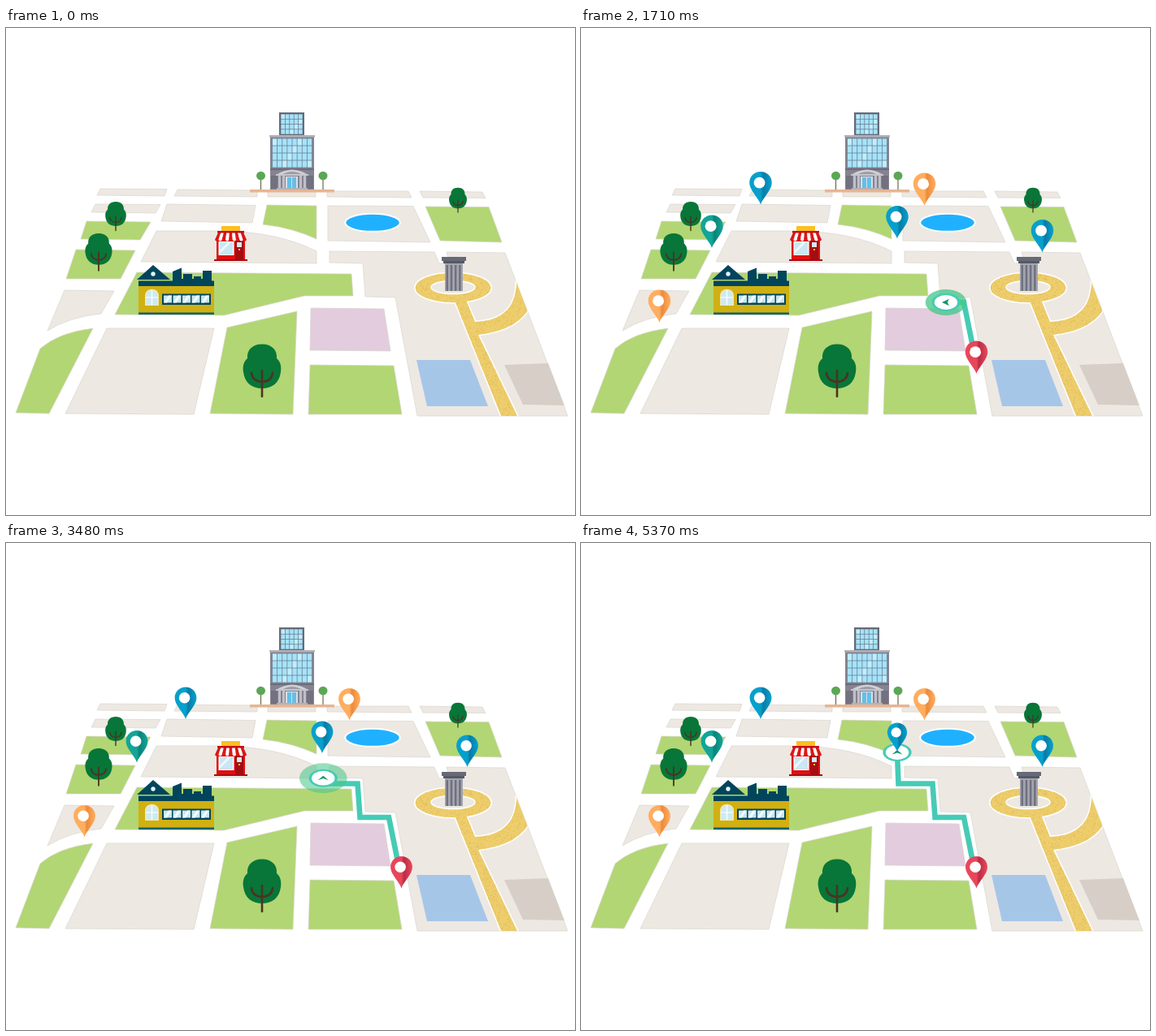
Write an HTML page with a canvas that moves like this. It is 700 by 600 pixels and loops after 5400 ms.

```html
<!DOCTYPE html>
<html lang="en">
<head>
<meta charset="utf-8">
<title>Town map route</title>
<style>
html, body { margin: 0; width: 100%; height: 100%; overflow: hidden; background: #fff; }
canvas { display: block; width: 700px; height: 600px; }
</style>
</head>
<body>
<canvas id="stage" width="700" height="600"></canvas>
<script>
const LOOP = 5400, STEP = 30;
const stage = document.getElementById('stage').getContext('2d');
const mapLayer = document.createElement('canvas');
mapLayer.width = 700;
mapLayer.height = 600;
let c = mapLayer.getContext('2d');

const BEIGE = '#ede8e2', GREEN = '#b2d673', EDGE = '#d9d6cf';
const clamp = v => Math.max(0, Math.min(1, v));

function fill(d, color, edge, width = 0.7) {
  const p = new Path2D(d);
  c.fillStyle = color;
  c.fill(p);
  if (edge) line(p, edge, width);
}
function line(d, color, width) {
  c.strokeStyle = color;
  c.lineWidth = width;
  c.stroke(d instanceof Path2D ? d : new Path2D(d));
}
function box(x, y, w, h, color) {
  c.fillStyle = color;
  c.fillRect(x, y, w, h);
}
function oval(x, y, rx, ry, color, edge, width) {
  c.beginPath();
  c.ellipse(x, y, rx, ry, 0, 0, Math.PI * 2);
  if (color) { c.fillStyle = color; c.fill(); }
  if (edge) { c.strokeStyle = edge; c.lineWidth = width; c.stroke(); }
}

function drawBlocks() {
  [
    'M116 198L198 198.5L195 207L112 206Z',
    'M211 199L309 200V208L207 207Z',
    'M322 201H381V208H322Z',
    'M395 201L495 201L499 209L395 208Z',
    'M509 201L586 202L590 209.5L513 209Z',
    'M110 217L190 217.5L184 228L105 227Z',
    'M198 217L307 218.5L303 240L191 238Z',
    'M396 219L501 219.5L522 264L396 262Z',
    'M185 250L265 250Q335 251 382 275V290L166 288Z',
    'M398 275L527 276L533 290H546L542 276L614 277L691 478L506 478L479 332L442 331L439 290L398 289Z',
    'M72 323L133 324L117 352Q78 356 51 373Z',
    'M124 370L256 370L231 476L73 475Z'
  ].forEach(d => fill(d, BEIGE, EDGE));
  [
    'M321 218L382 219V260Q352 246 316 242Z',
    'M516 220L594 220.5L610 264L534 262Z',
    'M99 238L178 239L165 261L92 260Z',
    'M86 273L159 274L141 309L74 309Z',
    'M161 301L425 303L427 330L367 330L268 354L134 353Z',
    'M107 370Q65 375 42 395L12 474L53 475Z',
    'M272 369L358 349L353 476L251 475Z',
    'M374 415L477 416L487 476L372 476Z'
  ].forEach(d => fill(d, GREEN, EDGE));
  fill('M375 345L465 346L473 398L374 397Z', '#e2ccdd', EDGE);
  fill('M505 409L571 409L593 466L518 466Z', '#a6c6e8');
  fill('M613 415L667 413L687 465L636 464Z', '#d7cfc7');
  oval(451, 239.8, 33.8, 11, '#1fb1ff', '#fff', 2);
}

function drawSandPath() {
  c.save();
  c.clip(new Path2D('M490 277H614L691 478H490Z'));
  const sand = new Path2D('M552 336L610 480H630L581 378Q633 372 646 340L628 308Q630 360 577 362L566 335Z');
  const ring = new Path2D();
  ring.ellipse(550, 320, 46.5, 18, 0, 0, 7);
  ring.closePath();
  c.lineJoin = 'round';
  line(sand, '#fff', 3);
  line(ring, '#fff', 3);
  c.fillStyle = '#edcd6c';
  c.fill(sand);
  c.fill(ring);

  const all = new Path2D(sand);
  all.addPath(ring);
  c.clip(all);
  let seed = 7;
  const rnd = () => (seed = seed * 16807 % 2147483647) / 2147483647;
  c.fillStyle = '#e0b957';
  for (let i = 0; i < 2600; i++) c.fillRect(500 + rnd() * 145, 300 + rnd() * 180, 1, 1);
  oval(550, 319.5, 27, 8, BEIGE, '#fff', 1.5);
  c.restore();
}

function drawTree(x, y, s) {
  c.save();
  c.translate(x, y);
  c.scale(s, s);
  fill('M0 -65.5C12 -65.5 19 -58 18 -48C23 -44 24 -37 23 -31C21 -17 12 -11 0 -11C-12 -11 -21 -17 -23 -31C-24 -37 -23 -44 -18 -48C-19 -58 -12 -65.5 0 -65.5Z', '#087638');
  c.lineCap = 'round';
  line('M0 -1V-33M-13 -30Q-12 -20 0 -19Q12 -20 13 -30', '#4a3422', 2.6);
  c.restore();
}

function windows(x, y, w, h, cols, rows) {
  box(x, y, w, h, '#6b7f90');
  const cw = w / cols, rh = h / rows;
  for (let i = 0; i < cols; i++)
    for (let j = 0; j < rows; j++)
      box(x + i * cw + 0.4, y + j * rh + 0.4, cw - 0.8, rh - 0.8, (i + j) % 5 ? '#a6e3fb' : '#c0eeff');
}

function drawTower() {
  for (const x of [313.5, 390]) {
    box(x - 0.6, 186, 1.2, 13, '#6d6a4c');
    oval(x, 182, 5.5, 5.3, '#5ba755');
  }
  box(300, 199, 104, 3.5, '#e6b593');
  box(336, 104, 31, 29, '#656a78');
  windows(338, 106, 27, 25, 5, 4);
  box(325, 134, 54, 65, '#858391');
  box(324, 132, 56, 2.5, '#b3b1b8');
  windows(327.5, 136, 49, 36, 8, 4);
  box(325, 173, 54, 2, '#6d6b79');
  box(326, 182, 8, 16, '#73717f');
  box(370, 182, 8, 16, '#73717f');
  fill('M332 181Q352 168 372 181Z', '#d0d0d5');
  fill('M339 181Q352 173 365 181Z', '#9c9ca8');
  box(332, 180, 40, 2, '#c5c5cc');
  for (const x of [335, 340, 361, 366]) box(x, 182, 3, 16, '#bfbfc8');
  box(344, 183, 15, 15, '#d9dee4');
  box(346, 184, 5, 13, '#64bfe8');
  box(352, 184, 5, 13, '#64bfe8');
  box(333, 197, 38, 2, '#b3b1b8');
}

function drawShop() {
  box(265, 244, 23, 6, '#fcbf1e');
  box(259, 258, 35, 28, '#e01010');
  box(261.5, 263, 19, 17, '#fff');
  box(263, 264, 16, 15, '#c9e7f5');
  fill('M263 274L273 264H277L263 278Z', '#eef8fc');
  box(282, 262, 10, 23, '#a50d12');
  box(284, 264, 6, 6, '#d6eaf3');
  box(286, 272, 2, 2, '#f6c338');
  for (let i = 0; i < 9; i++) {
    const a = 261 + i * 31 / 9, b = 257 + i * 39 / 9;
    fill(`M${a} 252H${a + 3.5}L${b + 4.4} 261Q${b + 2.2} 264 ${b} 261Z`, i % 2 ? '#fff' : '#dd1616');
  }
  box(260, 250, 33, 2.5, '#c30f14');
  box(256, 285, 41, 2, '#a50d12');
}

function drawHall() {
  const navy = '#00455c';
  box(163, 317, 93, 34, '#d0b012');
  box(163, 350.5, 93, 2.5, '#086270');
  fill('M181 292L202 310H161Z', navy);
  oval(181, 303, 2.7, 2.7, '#e6f3f7');
  box(163, 311.5, 93, 6.5, navy);
  fill('M205 312V300L216 295.5V312ZM218 312V303H229V312ZM231 312V306H240V312ZM242 312V299H253V312Z', navy);
  box(205, 309, 48, 3, navy);
  fill('M171 342V330C171 319 188 319 188 330V342Z', '#f3e9b0');
  fill('M172.5 341V330C172.5 321 186.5 321 186.5 330V341Z', '#cdeaf2');
  line('M179.5 323V341M172 332H187', '#fff', 1.2);
  box(192, 327.5, 60, 13.5, navy);
  for (let i = 0; i < 5; i++) {
    const x = 194 + i * 11.5;
    box(x, 329.5, 10, 9, '#c6e6f0');
    fill(`M${x} 338.5L${x + 6} 329.5H${x + 10}L${x + 4} 338.5Z`, '#f2fafc');
  }
}

function drawMonument() {
  box(540, 289, 22, 35, '#a3a5b0');
  for (let i = 0; i < 4; i++) box(541.5 + i * 5.2, 292, 2.5, 32, '#6f727e');
  box(536, 282, 30, 5, '#666a76');
  box(538, 287, 26, 3, '#555965');
}

function drawMap() {
  box(0, 0, 700, 600, '#fff');
  drawBlocks();
  drawSandPath();
  drawTower();
  drawTree(114, 299.5, 0.71);
  drawTree(135, 250, 0.55);
  drawTree(556, 227.5, 0.47);
  drawTree(315, 455, 1);
  drawShop();
  drawHall();
  drawMonument();
}

const BLUE = ['#06a0cc', '#087ba6'], ORANGE = ['#ffad5e', '#ec8a3b'];
const TEAL = ['#12a598', '#0b8278'], RED = ['#e9465a', '#b92d45'];
const pins = [
  [221, 216.5, BLUE], [422.5, 218, ORANGE], [161, 270, TEAL], [567.5, 275.5, BLUE],
  [96.5, 362, ORANGE], [486.5, 425, RED], [389, 258.5, BLUE]
];
const goal = pins[6];

function drawPin([x, y, colors], s) {
  if (s <= 0) return;
  c.save();
  c.translate(x, y - 19.5);
  c.scale(s, s);
  const shade = c.createLinearGradient(-13, 0, 13, 0);
  shade.addColorStop(0, colors[0]);
  shade.addColorStop(0.5, colors[0]);
  shade.addColorStop(0.62, colors[1]);
  shade.addColorStop(1, colors[0]);
  fill('M0 20C-2 12.5 -13.5 3 -13.5 -6.2C-13.5 -14 -7.5 -19.5 0 -19.5C7.5 -19.5 13.5 -14 13.5 -6.2C13.5 3 2 12.5 0 20Z', shade);
  oval(-1.4, -6.2, 6.8, 6.8, '#fff');
  c.restore();
}

// Route corners and the time each one is reached.
const route = [
  [483.5, 400, 620], [471, 338, 1300], [435.5, 338, 1960],
  [432.5, 296.5, 2640], [390.5, 296.5, 3320], [389, 258, 4226]
];

function routeAt(t) {
  const done = [[route[0][0], route[0][1]]];
  let left = false;
  for (let i = 1; i < route.length; i++) {
    const [x0, y0, t0] = route[i - 1], [x1, y1, t1] = route[i];
    const k = clamp((t - t0) / (t1 - t0));
    if (k <= 0) break;
    done.push([x0 + (x1 - x0) * k, y0 + (y1 - y0) * k]);
    left = i % 2 === 0;
  }
  return { done, left, head: done[done.length - 1] };
}

function drawRoute(t, phase) {
  const show = clamp((t - 500) / 120);
  if (!show) return;
  const { done, left, head } = routeAt(t);
  c.lineJoin = 'miter';
  c.lineCap = 'butt';
  line('M' + done.map(p => p.join(' ')).join('L'), '#45cbb5', 6.6);

  c.save();
  c.translate(head[0], head[1]);
  c.scale(show, show);
  const r = 17 + 21.5 * phase;
  oval(0, 0, r, r * 0.63, `rgba(70,200,135,${0.95 * Math.pow(1 - phase * phase, 1.35)})`);
  oval(0, 0, 17.6, 11, '#45cbb5');
  oval(0, 0, 14.2, 8.9, '#fff');
  fill(left ? 'M-5 0L4 -4.2L1.8 0L4 4.2Z' : 'M0 -3L6.5 2.5L0 0.4L-6.5 2.5Z', '#14966f');
  c.restore();
}

function render(t) {
  c = stage;
  c.drawImage(mapLayer, 0, 0);
  if (t < STEP) return;
  const phase = (0.6 + (t - 720) / 555 + 4) % 1;
  const grow = 1 - Math.pow(1 - clamp(t / 450), 3);
  const sway = 0.025 * clamp((5130 - t) / 300) * Math.cos((phase - 0.79) * Math.PI * 2);
  const scale = grow * (1 - sway);
  drawRoute(t, phase);
  for (const pin of pins)
    drawPin(pin, pin === goal ? scale - 0.1 * clamp((t - 5130) / 240) : scale);
}

drawMap();
const start = performance.now();
function tick() {
  const t = (performance.now() - start) % LOOP;
  render(Math.floor(t / STEP) * STEP);
  requestAnimationFrame(tick);
}
render(0);
requestAnimationFrame(tick);
</script>
</body>
</html>
```
